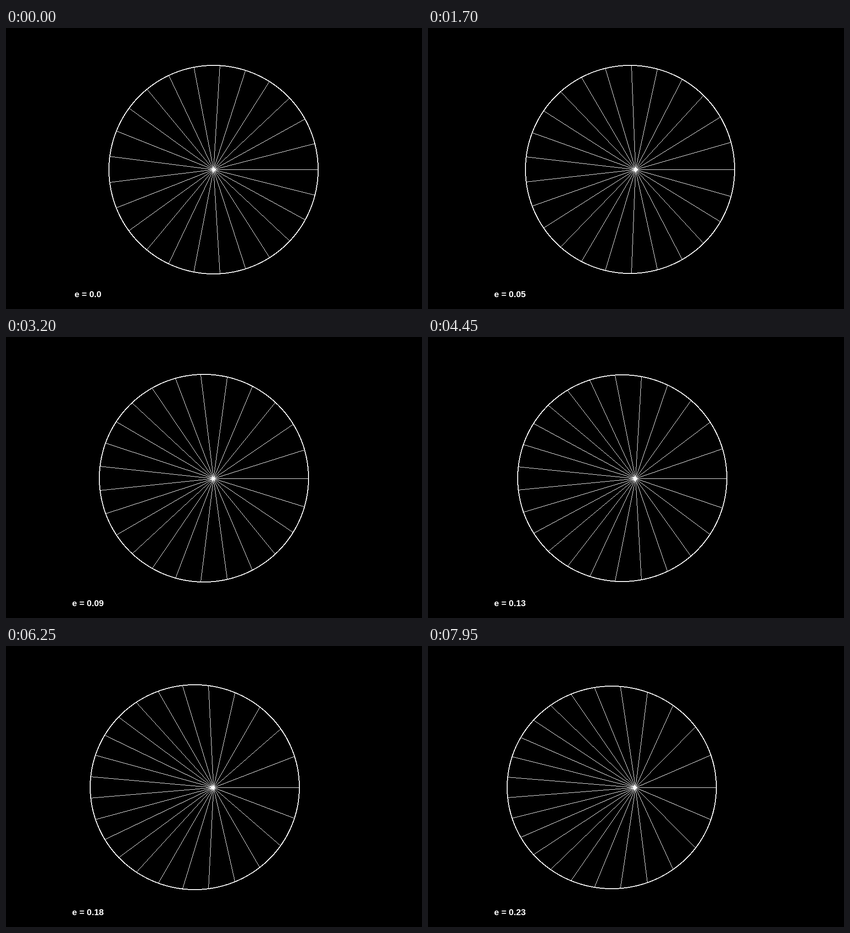
Write an HTML page with a canvas that moves like this. It is 909 by 616 pixels and loops after 8000 ms.

```html
<!DOCTYPE html>
<html lang="en">
<head>
<meta charset="utf-8">
<title>Equal areas in an ellipse</title>
<style>
  html, body { margin: 0; width: 100%; height: 100%; overflow: hidden; background: #000; }
  canvas { display: block; }
</style>
</head>
<body>
<canvas id="stage" width="909" height="616"></canvas>
<script>
const ctx = document.getElementById("stage").getContext("2d");
const LOOP = 8000, TICK = 50, STEP = 0.00162;
const FOCUS = { x: 453, y: 310 };
const A = 229, RAYS = 25;

// Eight steps per nine ticks, with one extra pause.
function eccentricity(time) {
  const tick = Math.floor(time / TICK);
  const steps = tick - Math.floor(tick / 9) - (tick >= 49 ? 1 : 0);
  return steps * STEP;
}

// Kepler's equation: M = E - e sin E
function eccentricAnomaly(M, e) {
  let E = M;
  for (let i = 0; i < 6; i++) E -= (E - e * Math.sin(E) - M) / (1 - e * Math.cos(E));
  return E;
}

// Hard-edged one-pixel line
function pixelLine(x0, y0, x1, y1) {
  const dx = Math.abs(x1 - x0), dy = Math.abs(y1 - y0);
  const sx = Math.sign(x1 - x0), sy = Math.sign(y1 - y0);
  let err = dx - dy;
  for (;;) {
    ctx.fillRect(x0, y0, 1, 1);
    if (x0 === x1 && y0 === y1) return;
    const twice = 2 * err;
    if (twice > -dy) { err -= dy; x0 += sx; }
    if (twice < dx) { err += dx; y0 += sy; }
  }
}

// Hard-edged two-pixel ring inside the given box
function pixelRing(left, top, width, height) {
  const rx = width / 2, ry = height / 2, cx = left + rx;
  const half = (y, a, b) => Math.abs(y) < b ? a * Math.sqrt(1 - (y / b) ** 2) : 0;
  for (let row = 0; row < height; row++) {
    const y = row + 0.5 - ry;
    const outer = half(y, rx, ry), inner = half(y, rx - 2, ry - 2);
    const l0 = Math.round(cx - outer), l1 = Math.round(cx - inner);
    const r0 = Math.round(cx + inner), r1 = Math.round(cx + outer);
    ctx.fillRect(l0, top + row, l1 - l0, 1);
    ctx.fillRect(r0, top + row, r1 - r0, 1);
  }
}

function draw(time) {
  const e = eccentricity(time);
  const flat = Math.sqrt(1 - e * e), b = A * flat;

  ctx.fillStyle = "#000";
  ctx.fillRect(0, 0, 909, 616);
  ctx.fillStyle = "#fff";

  const left = Math.floor(FOCUS.x + 0.4 - A - A * e);
  pixelRing(left, Math.floor(FOCUS.y - b), 2 * A + 1, Math.floor(2 * b) + 1);

  const reach = A - 0.5;
  for (let k = 0; k < RAYS; k++) {
    const E = eccentricAnomaly(2 * Math.PI * k / RAYS, e);
    const x = FOCUS.x + reach * (Math.cos(E) - e);
    const y = FOCUS.y - reach * flat * Math.sin(E);
    pixelLine(FOCUS.x, FOCUS.y, Math.floor(x), Math.floor(y));
  }

  const value = Math.round(e * 100) / 100;
  ctx.font = 'bold 19px "Liberation Sans", Arial, sans-serif';
  ctx.textAlign = "center";
  ctx.fillText("e = " + (value || "0.0"), 179, 590);
}

function frame() {
  draw(performance.now() % LOOP);
  requestAnimationFrame(frame);
}
frame();
</script>
</body>
</html>
```
